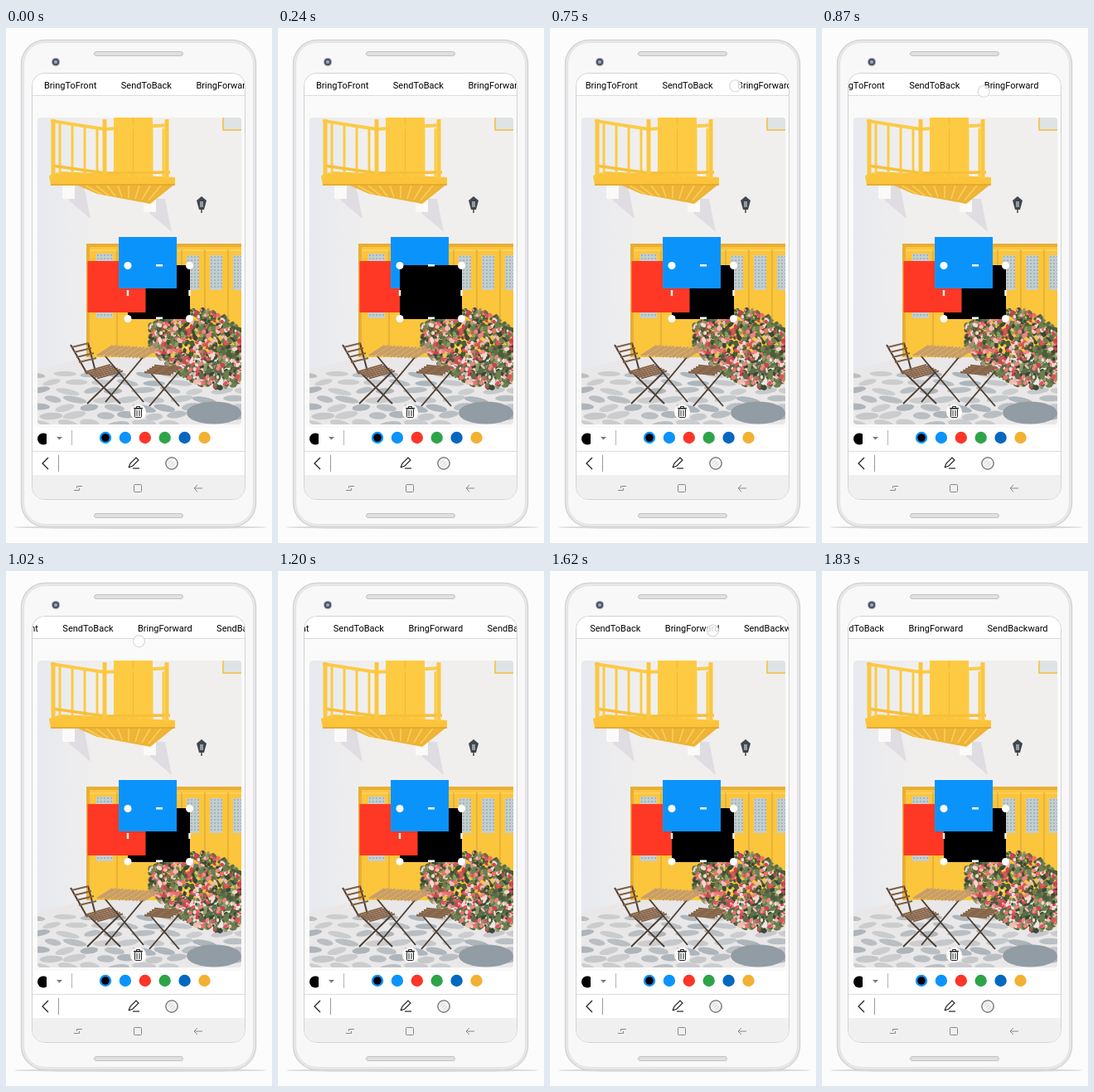
An HTML page with a canvas that plays this animation: 321 px wide and 621 px high, repeating every 1860 ms.

```html
<!DOCTYPE html>
<html lang="en">
<head>
<meta charset="utf-8">
<title>Layer order demo</title>
<style>
html, body { margin: 0; width: 100%; height: 100%; overflow: hidden; background: #fcfcfc; }
canvas { display: block; }
</style>
</head>
<body>
<canvas id="stage" width="321" height="621"></canvas>
<script>
const view = document.getElementById('stage').getContext('2d');
const base = document.createElement('canvas');
base.width = 321;
base.height = 621;
let c = base.getContext('2d');

let seed = 7;
const rnd = (a = 0, b = 1) => a + (b - a) * ((seed = seed * 16807 % 2147483647) / 2147483647);
const pick = list => list[Math.floor(rnd(0, list.length))];
function repeat(n, f) {
  for (let i = 0; i < n; i++) f(i);
}

function paint(fill, stroke, w = 1) {
  if (fill) { c.fillStyle = fill; c.fill(); }
  if (stroke) { c.strokeStyle = stroke; c.lineWidth = w; c.stroke(); }
}
function rect(fill, x, y, w, h) {
  c.fillStyle = fill;
  c.fillRect(x, y, w, h);
}
function round(x, y, w, h, r, fill, stroke, lw) {
  c.beginPath();
  c.roundRect(x, y, w, h, r);
  paint(fill, stroke, lw);
}
function oval(x, y, rx, ry, fill, turn = 0) {
  c.beginPath();
  c.ellipse(x, y, rx, ry, turn, 0, 7);
  paint(fill);
}
function dot(x, y, r, fill, stroke, lw) {
  c.beginPath();
  c.arc(x, y, r, 0, 7);
  paint(fill, stroke, lw);
}
function trace(p) {
  c.beginPath();
  for (let i = 0; i < p.length; i += 2) c.lineTo(p[i], p[i + 1]);
}
function poly(fill, ...p) {
  trace(p);
  paint(fill);
}
function line(color, w, ...p) {
  trace(p);
  paint(null, color, w);
}
function clipped(x, y, w, h, r, f) {
  c.save();
  c.beginPath();
  c.roundRect(x, y, w, h, r);
  c.clip();
  f();
  c.restore();
}

function phone() {
  rect('#fcfcfc', 0, 0, 321, 621);
  oval(162, 602, 152, 2, '#d9d9db');
  round(18.5, 14.5, 283, 587, 29, '#e9e9ec', '#d4d4d8', 1.5);
  round(21.5, 17.5, 277, 581, 26, '#f8f8f9', '#e2e2e5');
  for (const y of [28.5, 585.5]) round(106.5, y, 107, 5, 2.5, '#e0e0e1', '#c2c2c5');
  dot(60, 41, 4.8, '#4b5566', '#c4c6ca');
  dot(60, 41, 2, '#9aabc0');
  round(31.5, 54.5, 257, 514, 15, '#fafafa', '#d2d2d5');
}

function balcony() {
  rect('#fdca42', 130, 108, 47, 72);
  line('#f2b932', 1, 153.5, 108, 153.5, 180);
  for (const [x, y] of [[68, 190], [166, 206]]) {
    poly('#dfdde1', x + 6, y, x + 26, y, x + 34, y + 40, x + 8, y + 18);
    rect('#fbfaf9', x, y, 15, 16);
  }
  poly('#edb437', 85, 189, 204, 188, 174, 212, 110, 200);
  repeat(8, i => line('#fbcf5c', 1.5, 96 + i * 13, 190, 116 + i * 8, 201 + i));
  poly('#fbc43a', 52, 178, 66, 173, 204, 180, 204, 189, 54, 190);
  line('#dfa42e', 1.5, 54, 189, 204, 189);
  repeat(4, i => line('#fccb45', 3, 65 + i * 15, 114 + i * 2, 65 + i * 15, 178));
  repeat(5, i => line('#fccb45', 3, 134 + i * 14, 121, 134 + i * 14, 180));
  line('#fccb45', 4, 54, 112, 119, 122, 196, 117);
  line('#f7c03a', 3.5, 56, 166, 119, 175, 198, 174);
  for (const x of [57, 119, 194]) line('#fbc740', 5, x, 110, x, 182);
}

function lattice(x, y, w, h) {
  rect('#c4ced0', x, y, w, h);
  for (let j = 2; j < h; j += 4)
    for (let i = 2; i < w; i += 4) dot(x + i, y + j, 1, '#93aeba');
}

function doors() {
  rect('#e8ae36', 97, 260, 187, 137);
  rect('#fbc53c', 101, 264, 183, 133);
  rect('#fdd05a', 101, 267, 183, 2);
  lattice(109, 272, 20, 78);
  repeat(4, i => {
    const x = 190 + i * 28;
    lattice(x, 274, 15, 42);
    line('#dda436', 1.2, x - 6, 267, x - 6, 396);
  });
  line('#dda436', 1.2, 134, 267, 134, 396);
}

function ground() {
  poly('#e9e7e7', 38, 412, 97, 397, 284, 397, 284, 478, 38, 478);
  repeat(60, i => {
    const row = Math.floor(i / 9), x = 36 + i % 9 * 31 + row % 2 * 15 + rnd(0, 8);
    oval(x, 416 + row * 10 + rnd(0, 3), rnd(10, 15), 3 + row * .25,
      pick(['#b9bec3', '#c5c8cb', '#adb5bb', '#cbcccd']), rnd(-.25, .25));
  });
  oval(251, 464, 33, 13.5, '#919ca4');
}

// Blossoms fill a band that sinks and swells to the right
function flowers() {
  const scatter = (n, colors, size) => repeat(n, () => {
    const u = rnd(), half = 14 + 32 * Math.sin(2.6 * u);
    oval(174 + 112 * u, 372 + 24 * u + half * rnd(-1, 1), size * rnd(.6, 1.5), size * rnd(.5, 1.1),
      pick(colors), rnd(0, 6));
  });
  scatter(650, ['#4b5d3a', '#6c7f4e', '#3a4733', '#8f9a68', '#5b6c48'], 3);
  scatter(260, ['#e2505a', '#ee8582', '#cf4052', '#f2b9b2', '#ea7068', '#f5d8d0'], 2.4);
  scatter(60, ['#70834f', '#44523a'], 1.8);
}

function crossLegs(x, y, w, h) {
  line('#4c3d33', 1.9, x, y, x + w, y + h);
  line('#4c3d33', 1.9, x + w, y, x, y + h);
}
// Parallel slats from (x, y), each moved on by (dx, dy)
function slats(color, n, x, y, w, h, dx, dy) {
  repeat(n, i => line(color, 2.3, x + i * dx, y + i * dy, x + w + i * dx, y + h + i * dy));
}

function furniture() {
  crossLegs(98, 414, 40, 39);
  line('#4c3d33', 2, 78, 382, 98, 417);
  line('#4c3d33', 2, 99, 380, 108, 414);
  slats('#806049', 4, 79, 385, 21, -5, 3, 6);
  slats('#866548', 6, 95, 415, 31, -9, 3, 1.5);
  crossLegs(120, 396, 46, 55);
  slats('#c69d6c', 7, 110, 395, 19, -12, 8.5, .5);
  slats('#c69d6c', 7, 114, 395, 19, -12, 8.5, .5);
  crossLegs(173, 414, 36, 42);
  slats('#866548', 5, 167, 415, 32, 3, 3, -2);
}

function photo() {
  const wall = c.createLinearGradient(38, 0, 110, 0);
  wall.addColorStop(0, '#e6e9ee');
  wall.addColorStop(1, '#f1efee');
  rect(wall, 38, 108, 246, 370);
  rect('#dfe3e6', 262, 108, 22, 16);
  line('#f0c862', 2, 262, 108, 262, 123, 284, 123);
  balcony();
  doors();
  ground();
  // Wall lamp
  poly('#3f464e', 230, 208, 236, 203, 242, 208, 239, 219, 233, 219);
  rect('#8f9ba6', 234, 209, 4, 7);
  line('#3f464e', 1.5, 236, 219, 236, 223);
  flowers();
  furniture();
}

function trash() {
  dot(159.5, 463, 9.5, '#fff');
  line('#222', 1.2, 154, 458.5, 165, 458.5);
  round(157.5, 456.5, 4, 2, 0, null, '#222');
  round(155.5, 459, 8, 10.5, 1, null, '#222');
  for (const x of [158, 161]) line('#222', 1, x, 461, x, 468);
}

function toolbars() {
  rect('#fff', 32, 482, 256, 57);
  rect('#dcdcdc', 32, 510, 256, 1);
  clipped(36, 486, 13, 18, 0, () => dot(45, 495.5, 7, '#000'));
  poly('#777', 61, 493, 68, 493, 64.5, 496.5);
  line('#b5b5b5', 1, 79.5, 485, 79.5, 503);
  ['#0b93fb', '#0b93fb', '#fc3528', '#2ea44a', '#0568c0', '#f3b032']
    .forEach((color, i) => dot(120 + i * 23.9, 494, 7.2, color));
  dot(120, 494, 4.8, '#000');
  line('#222', 1.3, 51, 518, 44, 525, 51, 532);
  line('#999', 1, 63.5, 515, 63.5, 535);
  // Pencil and opacity
  line('#222', 1.2, 148, 530, 150, 525, 157, 518, 160, 521, 153, 528, 148, 530);
  line('#222', 1.2, 153, 531, 161, 531);
  dot(200, 525, 7.2, '#f3f3f3', '#444');
  repeat(5, i => line('#d0d0d0', 1, 194 + i * 2, 523 + i * 2, 198 + i * 2, 519 + i * 2));
  // Navigation bar
  round(32, 539, 256, 29, [0, 0, 14, 14], '#f0f0f0');
  line('#888', 1, 92, 552.5, 85.5, 552.5, 85.5, 555);
  line('#888', 1, 82, 557.5, 88.5, 557.5, 88.5, 555);
  round(154.5, 550.5, 9, 9, 1, null, '#888');
  line('#888', 1, 237, 555, 227, 555);
  line('#888', 1, 231, 551, 227, 555, 231, 559);
}

phone();
clipped(38, 108, 246, 370, 4, photo);
trash();
toolbars();
c = view;

const boxes = {
  red: ['#fe3824', 98.5, 281, 70, 62],
  blue: ['#0b93fc', 136, 252, 70, 62],
  black: ['#000', 147, 286, 75, 65]
};
const labels = ['BringToFront', 'SendToBack', 'BringForward', 'SendBackward'];
const taps = [[120, 78], [390, 170], [1290, 181]];

function ease(t, a, b) {
  const u = Math.min(1, Math.max(0, (t - a) / (b - a)));
  return u * u * (3 - 2 * u);
}

function order(t) {
  if (t >= 210 && t < 450) return ['red', 'blue', 'black'];
  if (t >= 1320) return ['red', 'black', 'blue'];
  return ['black', 'red', 'blue'];
}

function touch(x, y, alpha = 1) {
  c.globalAlpha = alpha;
  dot(x, y, 7, 'rgba(255,255,255,.8)', '#dadadc', 1.2);
  c.globalAlpha = 1;
}

function menu(shift) {
  rect('#fff', 32, 55, 256, 26);
  c.fillStyle = '#000';
  c.font = '11px Roboto, sans-serif';
  let x = 46 - shift;
  for (const text of labels) {
    c.fillText(text, x, 72.5);
    x += c.measureText(text).width + 29.5;
  }
}

function selection() {
  for (const x of [147, 221.5]) {
    rect('#fff', x - 1.2, 316, 2.4, 7);
    for (const y of [286.5, 350.5]) dot(x, y, 4.5, '#fff');
  }
  for (const y of [285, 348.5]) rect('#fff', 181, y, 8, 2.5);
}

function draw(t) {
  c.drawImage(base, 0, 0);
  for (const name of order(t)) rect(...boxes[name]);
  selection();

  const first = ease(t, 705, 1050), second = ease(t, 1500, 1800);
  clipped(32, 55, 256, 26, [15, 15, 0, 0], () => menu(72 * first + 53 * second));
  rect('#dcdcdc', 32, 81, 256, 1);
  for (const [start, x] of taps)
    if (t >= start && t < start + 120) touch(x, 64, 1 - (t - start) / 120);
  if (t >= 720 && t < 1050) touch(227 - 68 * first, 69 + 16 * first);
  if (t >= 1500 && t < 1710) touch(215 - 53 * second, 69 + 8 * second);
}

function tick() {
  draw(Math.floor(performance.now() % 1860 / 30) * 30);
  requestAnimationFrame(tick);
}
tick();
</script>
</body>
</html>
```
